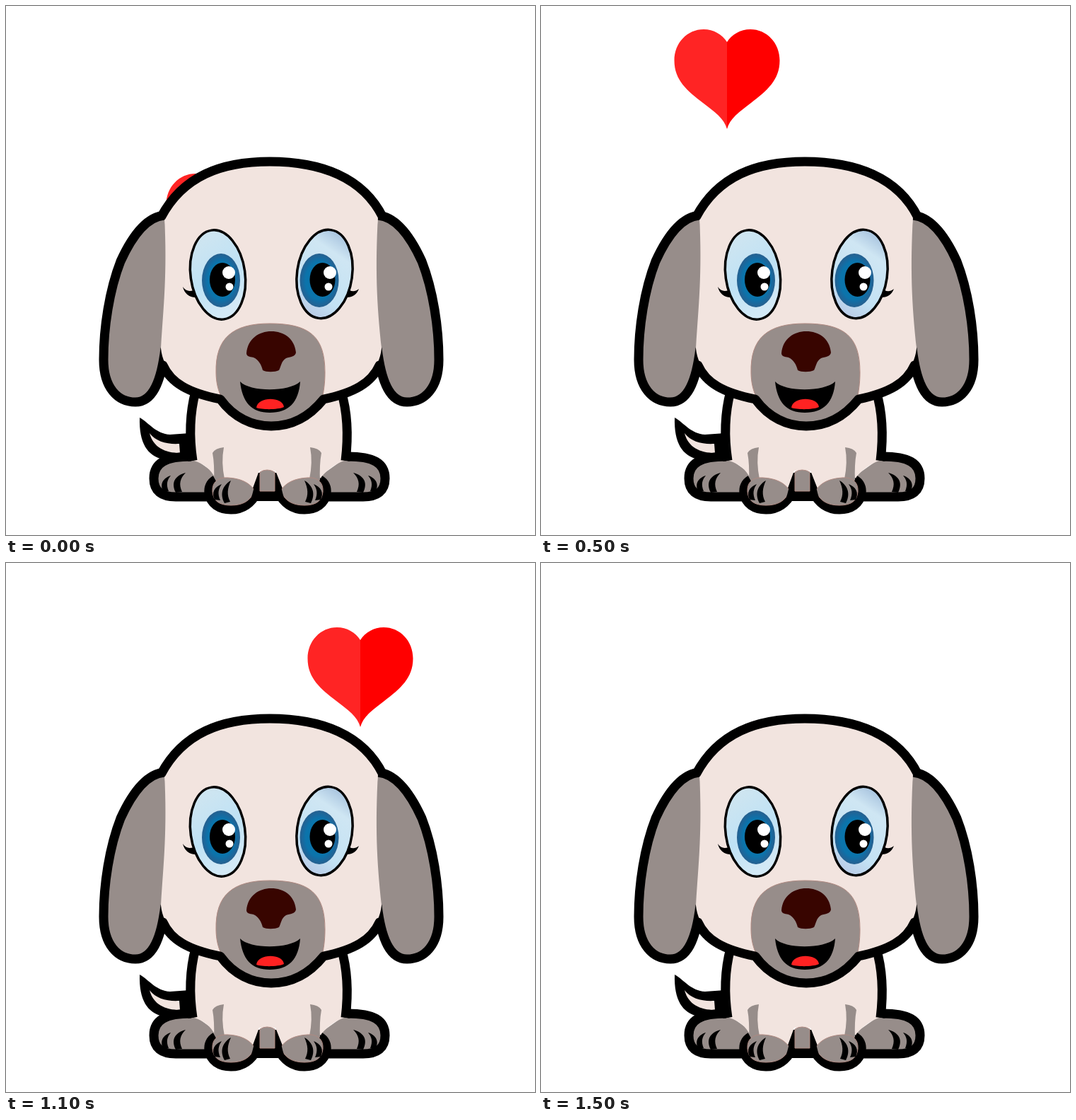
These frames come from a looping animation (748 px wide and 748 px high, 1600 ms). An HTML page:

```html
<!DOCTYPE html>
<html lang="en">
<head>
<meta charset="utf-8">
<title>Puppy with hearts</title>
<style>
html, body { margin: 0; width: 100%; height: 100%; overflow: hidden; background: #fff; }
svg { display: block; width: 100vw; height: 100vh; }
.skin { fill: #f2e4df; }
.fur { fill: #978d8a; }
.rim { stroke: #b08a82; stroke-width: 1; }
.line { fill: none; stroke: #000; stroke-width: 13; stroke-linejoin: round; }
.round { stroke-linecap: round; }
.heart { animation: 1.6s step-end infinite; }
.left { animation-name: rise-left; }
.right { animation-name: rise-right; }
@keyframes rise-left {
  0% { transform: translate(301px, 237px); }
  6.25% { transform: translate(279px, 207px); }
  12.5% { transform: translate(273px, 172px); }
  18.75% { transform: translate(268px, 130px); }
  25% { transform: translate(264px, 83px); }
  31.25% { transform: translate(263px, 33px); }
  37.5% { transform: translate(263px, -26px); }
  43.75% { transform: translate(263px, -89px); }
  50%, 100% { transform: translate(263px, -160px); }
}
@keyframes rise-right {
  0% { transform: translate(430px, 300px); }
  56.25% { transform: translate(449px, 225px); }
  62.5% { transform: translate(485px, 157px); }
  68.75% { transform: translate(501px, 91px); }
  75% { transform: translate(500px, 23px); }
  81.25% { transform: translate(501px, -52px); }
  87.5% { transform: translate(501px, -128px); }
  93.75%, 100% { transform: translate(501px, -210px); }
}
</style>
</head>
<body>
<svg viewBox="0 0 748 748">
  <defs>
    <path id="half" d="M0 18C7 7 19 0 33 0C56 0 74.5 19 74.5 44C74.5 72 56 87 34 104C17 117 4 126 0 141Z"/>
    <g id="heart">
      <use href="#half" fill="#ff2424" transform="scale(-1 1)"/>
      <use href="#half" fill="#f00"/>
    </g>
    <linearGradient id="whiteL" x1="0" y1="0" x2="0.3" y2="1">
      <stop offset="0" stop-color="#d3e6ef"/><stop offset="0.6" stop-color="#bfe2f5"/><stop offset="1" stop-color="#d3e9f6"/>
    </linearGradient>
    <linearGradient id="whiteR" x1="0.7" y1="0" x2="0.4" y2="1">
      <stop offset="0" stop-color="#a3bfdc"/><stop offset="0.25" stop-color="#cfe6f3"/><stop offset="0.75" stop-color="#c3e2f4"/><stop offset="1" stop-color="#b9cbe6"/>
    </linearGradient>
    <radialGradient id="iris">
      <stop offset="0.7" stop-color="#0b74ab"/><stop offset="0.8" stop-color="#146ca3"/><stop offset="1" stop-color="#27608f"/>
    </radialGradient>
    <g id="ear">
      <path class="fur" d="M224 296C198 298 178 326 162 361C146 402 138 455 138 500C138 540 158 560 183 560C206 560 219 535 225 484L232 400Z"/>
      <path class="line" d="M224 296C198 298 178 326 162 361C146 402 138 455 138 500C138 540 158 560 183 560C206 560 219 535 225 484"/>
    </g>
    <g id="back-paw">
      <path class="fur" d="M209 668C209 646 226 637 262 637L300 664V690H240C220 694 209 686 209 668Z"/>
      <path class="line" d="M300 694H240C220 694 209 686 209 668C209 646 226 637 262 637"/>
      <path d="M222 686C217 675 223 667 233 664C228 670 226 676 230 686ZM240 688C233 674 239 664 254 660C246 668 244 676 249 687Z"/>
    </g>
    <g id="front-paw">
      <path class="line" d="M296 670C289 674 286 681 287 689C289 704 302 712 318 712C336 712 348 702 356 686"/>
      <path class="fur rim" d="M292 687C291 673 300 666 314 667C332 668 345 674 352 686C345 700 335 706 318 706C302 706 293 700 292 687Z"/>
      <path d="M358 665V692L344 700C351 690 348 680 358 665Z"/>
      <path d="M295 698C290 688 295 680 305 676C300 683 299 690 303 699ZM309 703C302 690 306 678 318 671C313 682 312 691 317 701Z"/>
    </g>
  </defs>

  <use class="heart left" href="#heart"/>
  <use class="heart right" href="#heart"/>

  <path d="M189 582C203 590 212 605 232 606L260 604V640L222 641C200 636 188 618 189 582Z"/>
  <path class="skin" d="M203 604C212 616 228 620 245 619L246 632C225 632 208 624 203 604Z"/>

  <path d="M290 660H455V700H290Z"/>
  <use href="#back-paw"/>
  <use href="#back-paw" transform="matrix(-1 0 0 1 745 0)"/>
  <path class="skin" d="M268 545C259 580 260 615 266 643C280 647 290 656 296 668L305 690H346L358 657H381L394 690H436L444 668C454 656 466 647 478 643C484 612 483 580 474 545Z"/>
  <path class="line" d="M268 545C260 575 259 610 264 643M474 545C483 575 484 610 480 643"/>
  <path id="leg" class="fur" d="M292 632Q296 625 308 624Q304 645 309 669L294 672Q295 648 292 632Z"/>
  <use href="#leg" transform="matrix(-1 0 0 1 738 0)"/>
  <path class="fur rim" d="M359 686V659Q369 653 380 659V686Z"/>
  <use href="#front-paw"/>
  <use href="#front-paw" transform="matrix(-1 0 0 1 740 0)"/>

  <use href="#ear"/>
  <use href="#ear" transform="matrix(-1 0 0 1 750 0)"/>

  <path class="skin" d="M224 297C250 240 305 220 373 220C445 220 505 242 526 297C522 370 524 420 531 484C528 515 505 540 447 556C428 582 402 594 375 594C348 594 322 582 306 556C245 540 222 515 219 484C223 420 228 380 224 297Z"/>
  <path class="fur rim" d="M297 518C296 470 320 449 373 449C430 449 451 468 451 518C451 535 449 545 447 556C428 582 402 594 375 594C348 594 322 582 306 556C300 545 297 532 297 518Z"/>
  <path class="line" d="M219 299C250 240 305 220 373 220C445 220 505 242 533 299"/>
  <path class="line round" d="M222 508C233 533 258 547 303 556C322 582 348 594 375 594C402 594 428 582 449 556C492 547 517 533 528 508"/>

  <path fill="#380500" d="M340 491C342 470 358 460 375 460C393 460 408 470 410 490C409 496 402 496 396 498C389 502 389 510 386 515C380 518 368 518 363 515C361 507 357 500 350 497C344 496 340 495 340 491Z"/>
  <path d="M331 531C345 546 400 546 416 531C414 560 400 575 373 575C347 575 334 560 331 531Z"/>
  <path fill="#ff2222" d="M354 568C356 552 391 552 393 567C385 571 362 571 354 568Z"/>

  <g stroke="#000" stroke-width="3.5">
    <ellipse cx="299.500" cy="380" rx="38.500" ry="63.500" fill="url(#whiteL)" transform="rotate(-8 299.500 380)"/>
    <ellipse cx="450.500" cy="379" rx="39" ry="63" fill="url(#whiteR)" transform="rotate(8 450.500 379)"/>
  </g>
  <path d="M250 397C254 403 259 404 265 402L268 412C259 412 252 406 250 397ZM499 400C494 404 490 404 486 402L482 412C490 412 496 408 499 400Z"/>
  <g fill="url(#iris)">
    <ellipse cx="304" cy="388" rx="27" ry="38"/>
    <ellipse cx="443" cy="388" rx="27.500" ry="38"/>
  </g>
  <ellipse cx="306" cy="387" rx="18" ry="24"/>
  <ellipse cx="447.500" cy="387" rx="18" ry="24"/>
  <g fill="#fff">
    <circle cx="315" cy="377" r="9"/><circle cx="316" cy="397" r="5.500"/>
    <circle cx="458" cy="377" r="9"/><circle cx="456" cy="397" r="5.500"/>
  </g>
</svg>
</body>
</html>
```
